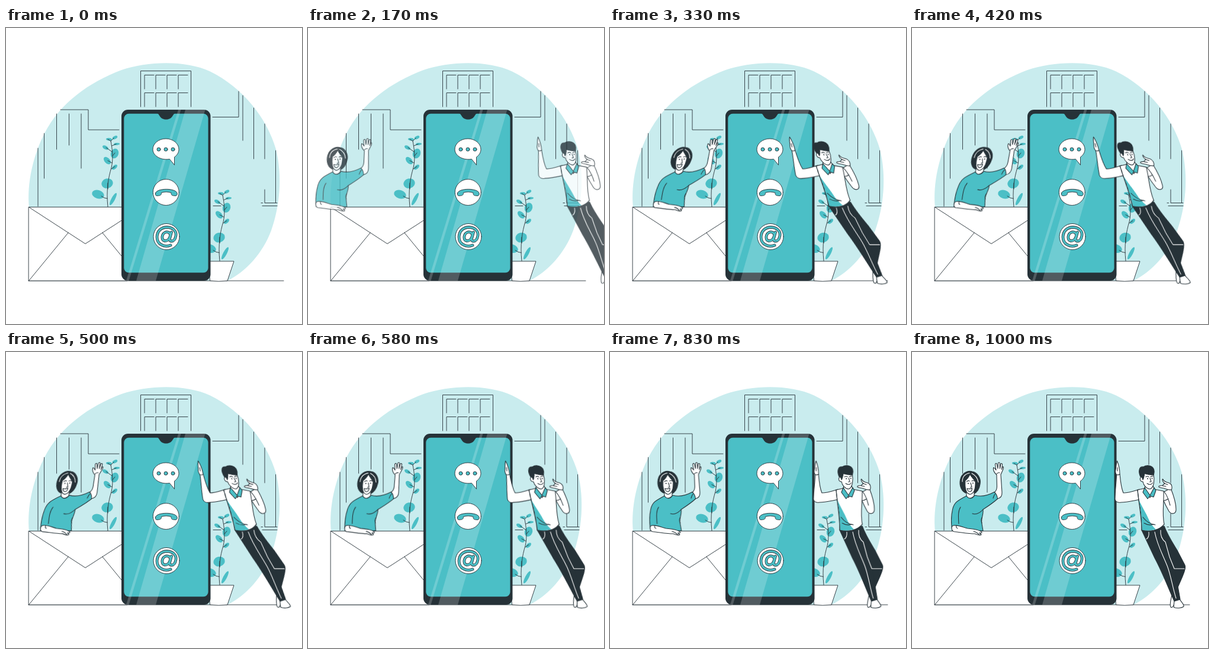
An HTML page for the animation above (1040 ms loop, 500x500 px).

```html
<!DOCTYPE html>
<html lang="en">
<head>
<meta charset="utf-8">
<title>Contact us</title>
<style>
  html, body { margin: 0; width: 100%; height: 100%; overflow: hidden; background: #fff; }
  svg { display: block; width: 500px; height: 500px; }
  .line { fill: none; stroke: #263238; stroke-width: .9; stroke-linecap: round; stroke-linejoin: round; }
  .person { stroke-width: 1.1; }
  .paper { fill: #fff; }
  .teal { fill: #4bbfc6; }
  .ink { fill: #263238; }
  .plain { stroke: none; }
  .light { stroke: #fff; }
  #woman { transform-origin: 0 248px; }
  #man { transform-origin: 0 308px; }
</style>
</head>
<body>
<svg viewBox="0 0 500 500">
  <path fill="#c9ecee" d="M39 303C35 262 46 215 65 178C92 126 140 92 195 71C240 56 303 54 345 73.500C399 100 441 152 456 205C467 250 463 300 448 342C434 380 405 412 374 427H39Z"/>

  <!-- buildings -->
  <g class="line">
    <path d="M227.500 133V72.500H312.500V133"/>
    <path id="panes" d="M234 103v-23.500h16M253 103v-23.500h16M272 103v-23.500h16M291 103v-23.500h16"/>
    <use href="#panes" y="30"/>
    <path d="M92 138H139V172H191M54 203V301M64.500 178V254M85.500 145V205M106.500 145V198M127 145V237"/>
    <path d="M349 150.500H393V107M400 114V190M418.500 135V221M437 162V221M437 273V295.500H458M431 295.500h2.500M433 300.500H458M455.500 207V295M350 300.500H363"/>
  </g>

  <!-- plants -->
  <g id="plant">
    <g class="teal">
      <ellipse cx="184" cy="185" rx="4.500" ry="2.500" transform="rotate(-25 184 185)"/>
      <ellipse cx="174" cy="188" rx="5" ry="2.200" transform="rotate(5 174 188)"/>
      <ellipse cx="187" cy="196" rx="5" ry="2" transform="rotate(-5 187 196)"/>
      <ellipse cx="168" cy="202" rx="5.500" ry="3" transform="rotate(30 168 202)"/>
      <ellipse cx="183.500" cy="212" rx="6.500" ry="8.500" transform="rotate(20 183.500 212)"/>
      <ellipse cx="171" cy="224" rx="7.500" ry="4.500" transform="rotate(48 171 224)"/>
      <ellipse cx="183.500" cy="235" rx="5.500" ry="3" transform="rotate(-42 183.500 235)"/>
      <ellipse cx="171" cy="262.500" rx="9.800" ry="8.200" transform="rotate(-15 171 262.500)"/>
      <ellipse cx="155.500" cy="281" rx="10.500" ry="7" transform="rotate(18 155.500 281)"/>
      <ellipse cx="181" cy="289" rx="11.500" ry="3" transform="rotate(-62 181 289)"/>
    </g>
    <path class="line" d="M172 302C169 274 173 252 178 236C182 218 179 202 177 191L182 186M177 191L172 188M179 199L186 196M179 209L169 202M179 228L172 224M178 238L184 234M172 272V262M171 288Q166 288 161 284M180 216L184 211"/>
  </g>
  <use href="#plant" x="189" y="91.500"/>

  <path class="line" d="M38 427H469"/>
  <path class="line paper" d="M342 394H385L374 427Q359 429 345 427Z"/>
  <g class="line">
    <path class="paper" d="M38.500 302.500H205V427H38.500Z"/>
    <path d="M38.500 302.500L134 364.500L200 322M38.500 427L105 346M163 346L200 391"/>
  </g>

  <!-- phone -->
  <rect class="ink" x="195" y="138" width="150.500" height="289" rx="11"/>
  <rect class="teal" x="199.300" y="144.800" width="142.200" height="268.500" rx="8"/>
  <path class="ink" d="M255 144H286C281 145 282 154.500 270.500 154.500C259 154.500 260 145 255 144Z"/>
  <path fill="#fff" opacity=".2" d="M291 138H295.500L207.500 427H203ZM303 138H336.500L253 427H220Z"/>
  <g class="line">
    <path class="paper" d="M276 221.500C262 224 248 216 248 205C248 195 258 187 270 187S292 195 292 205C292 210 289 215 284.500 218V231Z"/>
    <g class="teal">
      <circle cx="258" cy="205" r="3"/><circle cx="270" cy="205" r="3"/><circle cx="282" cy="205" r="3"/>
    </g>
    <circle class="paper" cx="270.300" cy="277.500" r="22"/>
    <path class="teal" d="M252.500 279C254 270 287 270 289 279C290 283 287 284 283.500 283.300C280 283 279 282 279 278.300C274 276.500 267 276.500 262.500 278.300C262.500 282 261 283 257.500 283.300C254 284 251.500 283 252.500 279Z"/>
    <circle class="paper" cx="271" cy="352.500" r="22"/>
    <g stroke-width="4.800">
      <path id="swirl" d="M278 367C267 371 255 365.500 255 353C255.500 342 263 336.500 272 336.500C282 337 288 343 287 350.500C286 357 283 360 279.500 360C276 360 276 357 277 354L279.500 345M277.500 351C276 357 272 360 268 359.500C264 359 263 354 264.500 350C266 346 270 344 274 345C277 346 278 348 277.500 351Z"/>
      <use href="#swirl" stroke="#4bbfc6" stroke-width="3.200"/>
    </g>
  </g>

  <g id="woman" class="line person">
    <!-- raised forearm and hand -->
    <path class="paper" d="M139 237C142 235 143.500 232 143.500 227L143 207.500C139 204 137 199 137.500 195.500C139 194.500 140 197 142 199.500L140.500 190C141 187.500 143 187.500 143.500 190L145 197L145.500 188C146 186 148 186 148.300 188L148.500 197L150 189C151 187.500 153 188.500 152.500 191L151.500 198.500L153 194C154.500 193 155 195 154 198L150 207L152 237C152.500 244 149 247 144 248Z"/>
    <path d="M143 206Q145 203 148 204"/>
    <path class="ink" d="M90 238C81 233 79 221 83 211C87 203 95 200 102 202C110 203 117 213 115 223C114 231 110 237 104 240Z"/>
    <path class="paper" d="M92 235V244Q97 251 105 243V235Z"/>
    <path class="teal" d="M92 243C97 250 103 247 106 242C117 245 129 242 139 236.500C142 239 144 243 144.500 248C137 255 129 260 120 266C121 277 116 280 118 290L120 302H68C66 290 66 277 68.500 266C71 254 77 251 92 243Z"/>
    <path class="paper" d="M90 217C93 215 96 211 98 206.500C100 211 104 214 107 219C107.500 230 105 239 98 240.500C91 239 89 229 90 217Z"/>
    <path class="light" d="M85 219C85 211 90 206 97 204.500M101 205C107 208 111 213 112 220"/>
    <path d="M92.500 219Q95 216.500 97 218M101 218Q103 216.500 105.500 218M99 221L101 228L98.500 228.500"/>
    <circle class="ink plain" cx="95" cy="222" r="1"/><circle class="ink plain" cx="103" cy="221.500" r="1"/>
    <path class="paper" d="M93 230.500Q97 232 101.500 230Q101.500 235.500 97.500 236Q94 235.500 93 230.500Z"/>
    <path d="M82 262C78 268 78 276 79 290M102 273Q111 276 120 266M140 240Q138 243 137 247M118 280Q116 284 118 289"/>
    <path class="paper" d="M70 293C79 292 86 296 94 298C104 299 114 300 118 304.500C118.500 306 116 306 114 305.500L117 308.500C115 310.500 111 309 106 307C94 307 80 304 71 303.500C66 302 66 294 70 293Z"/>
    <path d="M104 303Q109 304 114 309M75 293Q74 297 77 298"/>
  </g>

  <g id="man" class="line person">
    <!-- back leg and shoe -->
    <path class="paper" d="M440 403C439 415 434 426 437 431C441 433 443 427 447 412Z"/>
    <path class="ink" d="M410 299L426 294C432 310 440 322 448 335L461 360C463 364 460 372 457 379L447 402L440 394L444 366Z"/>
    <path class="paper" d="M443 420L452 417C454 422 460 426 459 430C455 433 447 433 442.500 431.500C441.500 428 443 424 443 420Z"/>
    <path class="ink" d="M388 301C402 304 415 301 424 294C426 312 429 330 435 346L444 367L453 418L443 421C433 399 423 372 410 348Z"/>
    <path class="light" d="M410 304C414 326 424 343 431 361C437 376 440 397 446 416M400 304Q401 313 396 316M420 301Q419 314 428 321L435 346L443 366L460 366"/>

    <!-- leaning arm -->
    <path class="paper" d="M384 232C374 235 366 238 357 238C353 229 352 217 351 206C351 198 349 190 346.500 184C344.500 189 345 194 344 199C343 202 344 205 345.500 208C345 222 343 235 343 249C344 253 348 255 353 254C364 254 374 251 386 249Z"/>
    <path d="M345.500 207Q348 208.500 351 206.500M347 195V201"/>

    <!-- calling arm -->
    <path class="paper" d="M410 233L426 236L437 230C441 240 446 256 446 266C446 274 438 275 434 269C430 262 427 256 424 249Z"/>
    <path d="M426 236C430 241 434 251 436 259M424 251Q429 251 433 248"/>
    <path class="paper" d="M423.500 214.500C425 218 429 220 434 221C439 223 440 228 438.500 232.500C434 234 429 231 425 230C422 229.500 419 229.500 417 228C416 226 419 225.500 423 225.500L427 222C424 220 422 216 423.500 214.500Z"/>
    <path d="M423 226L429 227M426 222L432 224"/>

    <!-- shirt -->
    <path class="paper" d="M381 233L394 230L410 232L425 235C426 254 422 273 426 291C418 301 402 305 388 301C388 284 387 266 383 250Z"/>
    <path class="teal plain" d="M383 249C389 263 395 271 400 283C403 290 408 296 412 299.500C403 302 396 302.500 388.500 301C388.500 284 387 266 383 249Z"/>
    <path d="M381 233C383 256 388 279 388 301C402 304 417 302 426 291M390 279Q398 290 411 292M392 289Q400 294 409 291"/>

    <!-- head -->
    <path class="paper" d="M394 222L393 234L402 246L410 233L407 226Z"/>
    <path class="teal" d="M393 229L390 237L398 248L402 243L408 245L412 234L409 229L402 242Z"/>
    <path class="paper" d="M391 205L408 206C410 216 409 229 402 231.500C396 231 391 225 390 219C385 220 383 211 389 211Z"/>
    <path class="ink" d="M386 211C382 202 383 193 391 194C397 190 405 192 408 197C410 201 409 205 408 208C402 207 396 207 393 205C392 209 392 213 390 216C389 211 387 210 386 211Z"/>
    <path d="M395 211Q397 209 400 211M403 211Q405 209 407 210M402 213L404 219L401.500 219.500M397 222Q403 226 406.500 221"/>
    <circle class="ink plain" cx="398" cy="214" r="1"/><circle class="ink plain" cx="405.500" cy="213.500" r="1"/>
  </g>
</svg>
<script>
  const LOOP = 1040, FAR = 250;
  const OUT = 'cubic-bezier(.25,.45,.33,1.33)';
  const SPRING = 'cubic-bezier(.36,-.01,.5,1.38)';

  // time in ms, distance away, skew in degrees, opacity, easing to the next step
  const steps = [
    [0, FAR, 20, 0, OUT],
    [495, 0, -10, 1, 'linear'],
    [530, 0, -10, 1, SPRING],
    [695, 0, 2, 1, SPRING],
    [1000, 0, 0, 1, 'linear'],
    [LOOP, 0, 0, 1, 'linear']
  ];

  function rushIn(id, side) {
    const frames = steps.map(([t, away, skew, opacity, easing]) => ({
      offset: t / LOOP,
      transform: `translateX(${side * away}px) skewX(${-side * skew}deg)`,
      opacity,
      easing
    }));
    document.getElementById(id).animate(frames, { duration: LOOP, iterations: Infinity });
  }

  rushIn('woman', -1);
  rushIn('man', 1);
</script>
</body>
</html>
```
